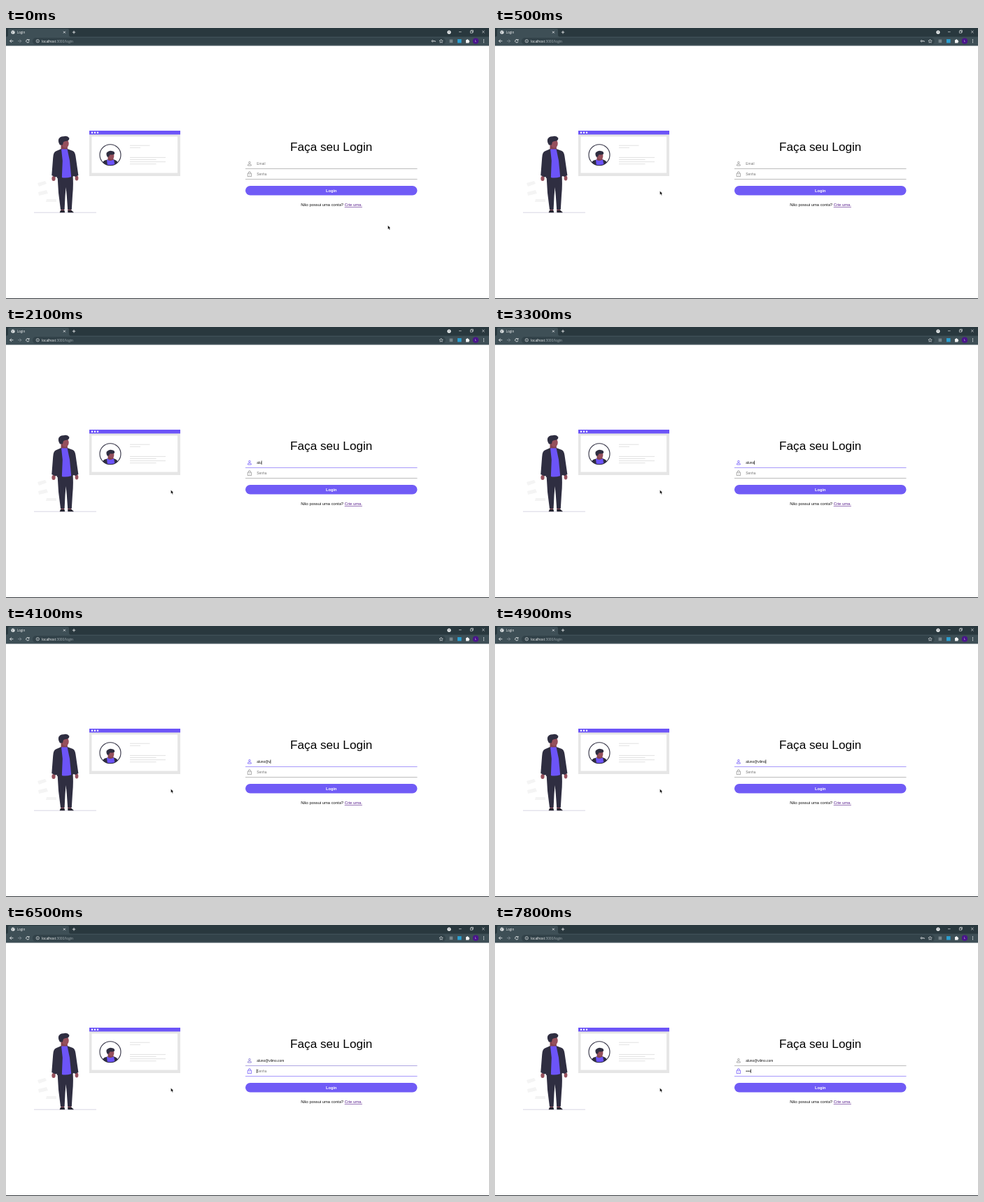
Animation, 690 px wide and 388 px high, one loop 8000 ms. Source, as an HTML page:

```html
<!DOCTYPE html>
<html lang="pt-BR">
<head>
<meta charset="utf-8">
<title>Login</title>
<style>
  html, body { margin: 0; width: 100%; height: 100%; overflow: hidden; background: #fff; }
  svg { display: block; width: 690px; height: 388px; }
  text { font-family: "Liberation Sans", Arial, sans-serif; white-space: pre; }
  .ui { font-family: "Open Sans", "Noto Sans", sans-serif; }
  .field { font-size: 4.9px; }
  .icon { fill: none; stroke-width: .75; }
  .rule { stroke-width: .8; stroke-opacity: .75; }
  .glyph { fill: none; stroke: #f2f4f5; stroke-width: .8; }
  .link { fill: #551a8b; text-decoration: underline; text-decoration-thickness: .5px; }
</style>
</head>
<body>
<svg viewBox="0 0 690 388">
  <rect width="690" height="388" fill="#fff"/>

  <!-- browser frame -->
  <rect width="690" height="13" fill="#29383e"/>
  <path d="M0 12.5H690V25.5H0ZM1 12.5Q3 12 3 10V3Q3 1 5 1H88Q90 1 90 3V10Q90 12 92 12.5Z" fill="#3e4f56"/>
  <rect x="38" y="14" width="590" height="9.6" rx="4.8" fill="#324249"/>
  <circle cx="10" cy="6" r="2.6" fill="#f1f3f4"/>
  <path d="M8.2 5.2L10 6L9.6 7.6M10.6 4L11.8 5.6" fill="none" stroke="#3e4f56" stroke-width=".7"/>
  <text class="ui" x="16" y="7.7" font-size="4.4" fill="#fff">Login</text>
  <g class="glyph">
    <path d="M82 4.7l2.8 2.8m0-2.8l-2.8 2.8M94.8 6.1h4.4m-2.2-2.2v4.4"/>
    <path d="M10.4 18.7H5.6m2.3-2.3l-2.3 2.3l2.3 2.3"/>
    <path d="M17 18.7h4.8m-2.3-2.3l2.3 2.3l-2.3 2.3" stroke="#87949a"/>
    <path d="M32.7 17.3a2.2 2.2 0 1 0 .4 1.9M33.1 16v1.7h-1.7"/>
    <circle cx="45.3" cy="18.7" r="2.2" stroke-width=".6"/>
    <path d="M45.3 18.4v1.5m0-2.6v.5" stroke-width=".6"/>
    <path d="M647 5.6h3.6M663.4 4.2h3v3h-3zM664.4 4.2v-1h3v3h-1M680.2 3.8l3.4 3.4m0-3.4l-3.4 3.4" stroke-width=".6"/>
    <path d="M621.6 16.2l.8 1.7l1.8.2l-1.3 1.3l.3 1.8l-1.6-.9l-1.6.9l.3-1.8l-1.3-1.3l1.8-.2z" stroke-width=".6"/>
    <g id="key"><circle cx="609.3" cy="18.7" r="1.1"/><path d="M610.4 18.7h2.8v1.2"/></g>
  </g>
  <circle cx="633" cy="6" r="2.6" fill="#f1f3f4"/>
  <path d="M632 5.3h2l-1 1.5z" fill="#29383e"/>
  <text class="ui" x="51" y="20.5" font-size="4.8" fill="#fff">localhost<tspan fill="#a9b3b7">:3000/login</tspan></text>
  <rect x="633.6" y="16.5" width="4.6" height="4.6" fill="#78868c"/>
  <rect x="645" y="16" width="5.6" height="5.4" fill="#2c9fd0"/>
  <path d="M657 17h1.3a.9.9 0 0 1 1.8 0h1.3v1.4a.9.9 0 0 1 0 1.8v1.4H657z" fill="#f1f3f4"/>
  <circle cx="671" cy="18.7" r="4.1" fill="#4a148c"/>
  <text class="ui" x="671" y="20.3" font-size="4" fill="#fff" text-anchor="middle">L</text>
  <g fill="#f1f3f4"><circle cx="682.5" cy="16.7" r=".6"/><circle cx="682.5" cy="18.7" r=".6"/><circle cx="682.5" cy="20.7" r=".6"/></g>
  <rect y="387" width="690" height="1" fill="#34383c"/>

  <!-- profile card -->
  <rect x="119" y="147" width="130" height="65" fill="#e6e6e6"/>
  <rect x="122.5" y="155.5" width="122.5" height="52" fill="#fff"/>
  <rect x="119" y="147" width="130" height="5.5" fill="#6c54f8"/>
  <g fill="#fff"><circle cx="123" cy="149.8" r="1.2"/><circle cx="127" cy="149.8" r="1.2"/><circle cx="131" cy="149.8" r="1.2"/></g>
  <path d="M177 168.2h28.5M177 171.4h15M177 185.4h51M177 188.5h37.5M177 191.6h51M177 194.7h37.5" stroke="#dedede" stroke-width=".9"/>
  <clipPath id="disc"><circle cx="149" cy="181.8" r="15"/></clipPath>
  <g clip-path="url(#disc)">
    <path d="M137 198q0-8 6-9l4-1h6l3 1q5 2 5 9z" fill="#2f2e41"/>
    <path d="M144 188.5l4 .5l6-.5l2 9.5h-11z" fill="#6c54f8"/>
    <path d="M145.5 183h8v5.5q-4 2.5-8 .5z" fill="#83434f"/>
    <ellipse cx="150.5" cy="183" rx="3.9" ry="4.9" fill="#96505c"/>
    <path d="M144.5 184.5Q142 179 145 177.5Q148 175 152 176.3Q156 177 155 180.5Q152 182 148.5 181.3L146.8 184.5Z" fill="#2f2e41"/>
  </g>
  <circle cx="149" cy="181.8" r="15" fill="none" stroke="#2f2e41" stroke-width="1.1"/>

  <!-- person -->
  <g fill="#f4f4f4"><path d="M45 222l11-3l2 4l-11 4zM46 235l12-3l2 5l-13 3zM58 245h14v4h-15z"/></g>
  <path d="M40 264.2h89" stroke="#cfcddd" stroke-width=".8"/>
  <g fill="#96505c">
    <ellipse cx="68" cy="215.5" rx="2.6" ry="3.6"/><ellipse cx="101" cy="215" rx="2.4" ry="3.4"/>
    <path d="M78.5 166h9l.5 8h-9.5z" fill="#83434f"/>
    <ellipse cx="84.8" cy="165.5" rx="4.9" ry="6.3"/>
    <path d="M78.5 258h4.5v4h-4.5zM88.5 258h4.5v4h-4.5z"/>
  </g>
  <path d="M73.5 211H95.5Q96.5 226 95 240L93.8 260H88.2L86.8 240L85.6 228L84.6 240L83.6 260H78L75 236Z" fill="#2f2e41"/>
  <path d="M78 261h5.5l.6 3.2H76.6zM88.2 261H93.6l3.4 3.2H88.4z" fill="#24232f"/>
  <path d="M78.5 173.5H88L91.5 182L93.5 213Q86 215.5 79.5 214L78 190Z" fill="#6c54f8"/>
  <path d="M79 173L71 176.5Q67.5 178 67.2 186L65.3 211L70.5 213.5L72.5 213L73 215L79.8 214.5L80.8 190Z" fill="#2f2e41"/>
  <path d="M87.5 173L95.5 176Q98.5 177 99.5 184L103.4 211L99 213L97 212L93.2 213.5L91 190Z" fill="#2f2e41"/>
  <path d="M77 167.5Q74 163 75.2 159Q77 155 82 155.2Q88 153.6 90.3 157.5Q90.8 161 87 161.8Q83.5 162 82 163.2L80.8 167.5Z" fill="#2f2e41"/>

  <!-- form -->
  <text x="464.7" y="175.5" font-size="17.15" text-anchor="middle" fill="#000">Faça seu Login</text>
  <g id="email">
    <path class="icon" d="M345.4 197v-.8q0-1.4 2.5-1.4t2.5 1.4v.8zM349.2 192.6a1.3 1.3 0 1 1-2.6 0a1.3 1.3 0 1 1 2.6 0z"/>
    <path class="rule" d="M342 201.5H587.5"/>
  </g>
  <g id="pass">
    <path class="icon" d="M345.2 208.2h5.4v4.4h-5.4zM346.4 208v-.8a1.5 1.5 0 0 1 3 0v.8M347.9 209.9v1"/>
    <path class="rule" d="M342 216.5H587.5"/>
  </g>
  <text class="field" id="emailText" x="358.3" y="196"/>
  <text class="field" id="passText" x="358.3" y="211"/>
  <rect id="caret" width=".7" height="5.6" fill="#111"/>
  <rect x="342" y="226" width="245.5" height="13.6" rx="6.8" fill="#705bf6"/>
  <text x="464.8" y="234.8" font-size="5.7" font-weight="bold" fill="#fff" text-anchor="middle">Login</text>
  <text x="421.2" y="255.4" font-size="5.8" fill="#111">Não possui uma conta? <tspan class="link">Crie uma.</tspan></text>

  <path id="mouse" d="M0 0V5.2L1.2 4.2L2.1 6.2L3 5.8L2.1 3.9H3.7Z" fill="#000" stroke="#fff" stroke-width=".25"/>
</svg>
<script>
const $ = id => document.getElementById(id);
const address = "aluno@vilmo.com";
// [time, characters present]
const emailKeys = [[1000, 0], [1100, 0], [1800, 1], [2000, 2], [2100, 3], [2500, 4], [3000, 5], [3900, 6],
  [4100, 7], [4400, 8], [4500, 9], [4600, 10], [4800, 11], [5100, 12], [5500, 15]];
const passKeys = [[6400, 0], [6800, 1], [7300, 2], [7500, 3], [7800, 4]];

const clamp = x => Math.max(0, Math.min(1, x));
const latest = (keys, t) => keys.filter(k => k[0] <= t).pop() || [0, 0];
const mix = (a, b, k) => `rgb(${a.map((v, i) => Math.round(v + (b[i] - v) * k))})`;

function setField(id, value, hint, focus) {
  const text = $(id + "Text");
  text.textContent = value || hint;
  text.setAttribute("fill", value ? "#111" : "#777");
  $(id).setAttribute("stroke", mix([145, 145, 145], [108, 84, 248], focus));
}

function draw(now) {
  const t = Math.floor(now % 8000 / 100) * 100;
  const onPass = t >= 6400;
  const email = latest(emailKeys, t), pass = latest(passKeys, t);
  const typed = address.slice(0, email[1]), dots = "•".repeat(pass[1]);

  setField("email", typed, "Email", clamp((t - 900) / 300) * (1 - clamp((t - 6300) / 500)));
  setField("pass", dots, "Senha", clamp((t - 6300) / 200));

  const [since, count] = onPass ? pass : email;
  const width = count ? $(onPass ? "passText" : "emailText").getComputedTextLength() : 0;
  $("caret").setAttribute("x", 358.2 + width);
  $("caret").setAttribute("y", onPass ? 206.4 : 191.4);
  $("caret").style.display = t >= 1000 && (t - since) % 1000 < 500 ? "" : "none";
  $("key").style.display = t < 1800 || t >= 6900 ? "" : "none";

  const p = clamp(t / 500), k = p * p * (3 - 2 * p);
  $("mouse").setAttribute("transform", `translate(${545.6 - 310 * k} ${282.7 - 49.3 * k})`);
}

const start = performance.now();
(function loop() {
  draw(performance.now() - start);
  requestAnimationFrame(loop);
})();
</script>
</body>
</html>
```
